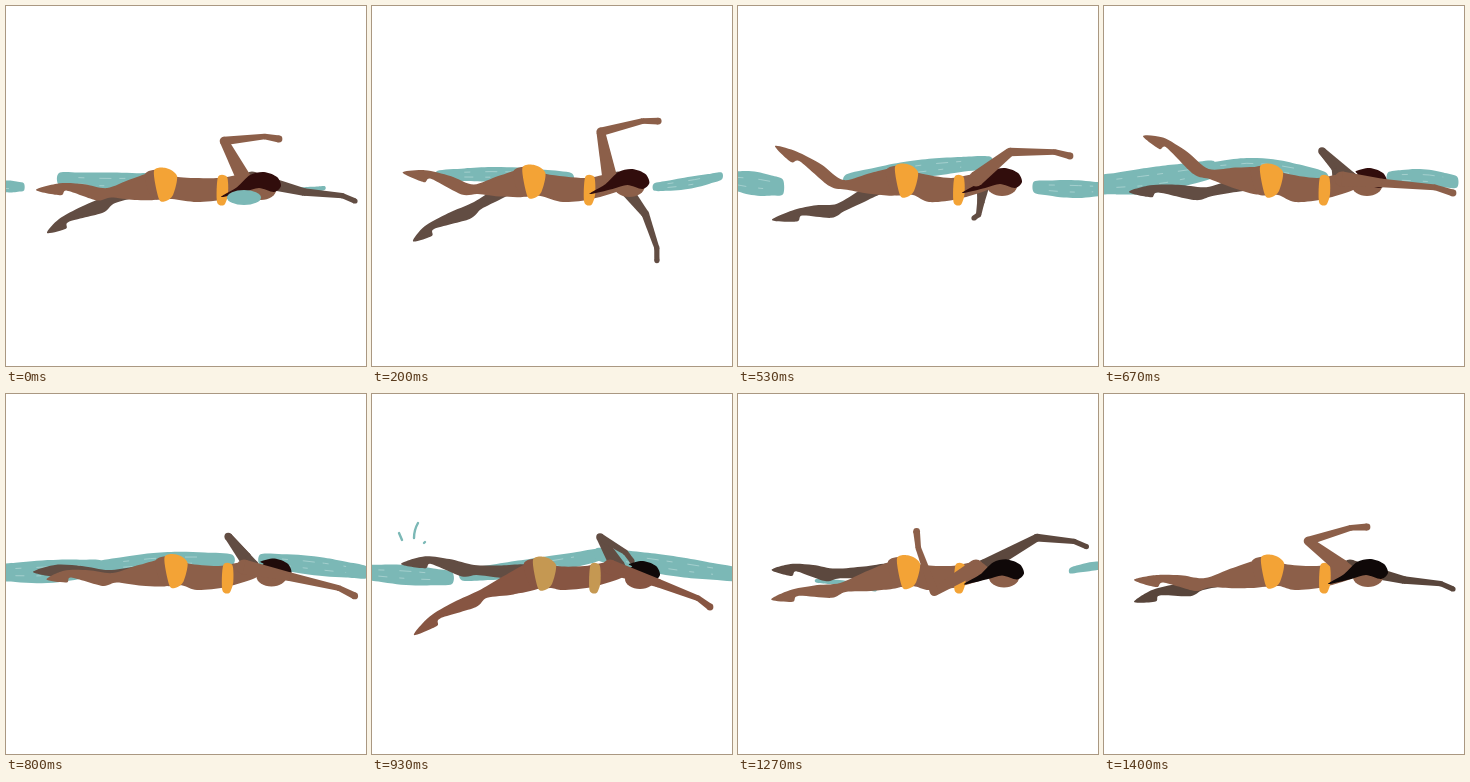
An HTML page that plays this animation: 360x360 px, repeating every 1.54 s.

```html
<!DOCTYPE html>
<html lang="en">
<head>
<meta charset="utf-8">
<title>Swimmer</title>
<style>
html, body { margin: 0; width: 100%; height: 100%; overflow: hidden; background: #fff; }
svg { display: block; width: 100vw; height: 100vh; }
</style>
</head>
<body>
<svg id="stage" viewBox="0 0 360 360"></svg>
<script>
const LOOP = 1540, STEPS = 22;
const WATER = '#7bb8b6', FOAM = '#b5d9d7';
const SHOULDER = { near: [238, 173], far: [246, 173] };
const GIRTH = { near: [7.5, 4.3, 2.8, 3.4], far: [7.5, 3.8, 2.6, 2.6] };
const stage = document.getElementById('stage');

// Key poses. Legs: knee, ankle, toe. Arms: elbow, hand.
// Waves: both ends, bow of the middle, half height.
const poses = [];
const pose = (at, joints) => poses.push({ at, joints });

pose(0, {
  hip: [152, 180],
  nearLeg: [102, 188, 57, 181, 30, 184], farLeg: [104, 195, 57, 215, 41, 227],
  nearArm: [218, 135, 273, 133], farArm: [298, 186, 349, 195],
  left: [-12, 180, 18, 181, 0, 6], mid: [53, 173, 150, 174, 3, 10], right: [285, 184, 319, 182, 1, 3]
});
pose(5, {
  hip: [156, 175],
  nearLeg: [103, 182, 54, 160, 31, 155], farLeg: [106, 205, 56, 227, 41, 241],
  nearArm: [238, 127, 293, 111], farArm: [252, 200, 237, 226],
  left: [-50, 176, -20, 178, 0, 9], mid: [74, 167, 232, 170, -5, 6], right: [280, 179, 370, 162, 2, 8]
});
pose(8, {
  hip: [161, 176],
  nearLeg: [106, 180, 59, 150, 37, 140], farLeg: [102, 203, 60, 207, 34, 214],
  nearArm: [272, 146, 332, 150], farArm: [243, 195, 236, 212],
  left: [-12, 174, 45, 181, 0, 12], mid: [108, 174, 252, 156, -2, 9], right: [296, 181, 370, 183, 1, 9]
});
pose(10, {
  hip: [160, 176],
  nearLeg: [104, 169, 60, 136, 39, 130], farLeg: [104, 187, 49, 183, 25, 186],
  nearArm: [278, 177, 349, 187], farArm: [218, 145, 231, 171],
  left: [-12, 179, 110, 163, 3, 13], mid: [90, 166, 222, 172, -8, 9], right: [284, 172, 353, 176, -2, 9]
});
pose(14, {
  hip: [165, 181],
  nearLeg: [111, 201, 62, 224, 42, 241], farLeg: [102, 177, 55, 166, 29, 170],
  nearArm: [286, 189, 338, 213], farArm: [228, 143, 260, 167],
  left: [-12, 178, 80, 184, 0, 10], mid: [90, 181, 230, 160, 3, 9], right: [225, 160, 370, 181, 1, 10]
});
pose(16, {
  hip: [166, 180],
  nearLeg: [106, 202, 55, 221, 38, 235], farLeg: [102, 162, 61, 136, 39, 128],
  nearArm: [261, 198, 246, 231], farArm: [244, 134, 294, 143],
  left: [-12, 178, 38, 171, 0, 13], mid: [117, 176, 233, 203, -4, 7], right: [282, 181, 370, 167, -4, 11]
});
pose(21, {
  hip: [161, 179],
  nearLeg: [102, 190, 55, 185, 30, 186], farLeg: [95, 193, 51, 199, 30, 208],
  nearArm: [204, 147, 263, 133], farArm: [300, 186, 349, 195],
  left: [-50, 178, -30, 178, 0, 0], mid: [52, 194, 74, 191, 0, 0], right: [365, 174, 380, 174, 0, 0]
});

const mix = (a, b, u) => a + (b - a) * u;
const mixAll = (a, b, u) => a.map((v, i) => mix(v, b[i], u));
const clamp = v => Math.min(1, Math.max(0, v));
const n = v => v.toFixed(1);
const rgb = (a, b, u) => `rgb(${mixAll(a, b, u).map(Math.round)})`;
const pairs = list => Array.from({ length: list.length / 2 }, (_, i) => [list[2 * i], list[2 * i + 1]]);
const shift = (list, [x, y]) => pairs(list).map(p => [p[0] + x, p[1] + y]);

// Arms turn around shoulder and elbow and reach further in a wide swing.
function mixArm(root, a, b, u) {
  const from = [...root, ...a], to = [...root, ...b], out = [...root];
  const bone = (p, i) => {
    const dx = p[i + 2] - p[i], dy = p[i + 3] - p[i + 1];
    return [Math.hypot(dx, dy), Math.atan2(dy, dx)];
  };
  for (const i of [0, 2]) {
    const [la, ta] = bone(from, i), [lb, tb] = bone(to, i);
    let turn = tb - ta;
    while (turn < -1.75) turn += 2 * Math.PI;
    while (turn > 4.53) turn -= 2 * Math.PI;
    const stretch = 1 + 0.25 * Math.sin(Math.PI * u) * clamp(Math.abs(turn) / 1.57);
    const len = mix(la, lb, u) * stretch, ang = ta + turn * u;
    out.push(out[i] + len * Math.cos(ang), out[i + 1] + len * Math.sin(ang));
  }
  return out;
}

function jointsAt(step) {
  let k = 0;
  while (k < poses.length - 2 && step >= poses[k + 1].at) k++;
  const a = poses[k], b = poses[k + 1], u = (step - a.at) / (b.at - a.at);
  const out = {};
  for (const name in a.joints) {
    const root = name.endsWith('Arm') && SHOULDER[name.slice(0, -3)];
    const from = a.joints[name], to = b.joints[name];
    out[name] = root ? mixArm(root, from, to, u) : mixAll(from, to, u);
  }
  return out;
}

const path = (d, fill) => `<path d="${d}" fill="${fill}"/>`;
const line = pts => 'M' + pts.map(p => p.map(n).join(' ')).join('L');
const oval = (x, y, rx, ry, fill) =>
  `<ellipse cx="${n(x)}" cy="${n(y)}" rx="${n(rx)}" ry="${n(ry)}" fill="${fill}"/>`;

function blob(pts, fill) {
  const at = i => pts[(i + pts.length) % pts.length];
  let d = line([pts[0]]);
  pts.forEach((q, i) => {
    const p = at(i - 1), r = at(i + 1), s = at(i + 2);
    d += 'C' + [q[0] + (r[0] - p[0]) / 7, q[1] + (r[1] - p[1]) / 7,
      r[0] - (s[0] - q[0]) / 7, r[1] - (s[1] - q[1]) / 7, r[0], r[1]].map(n).join(' ');
  });
  return path(d + 'Z', fill);
}

// Outline along thigh, shin and foot: bone, place on it, offset upwards.
function leg(hip, list, thigh, fill) {
  const j = [hip, ...pairs(list)];
  const spot = (i, u, up) => {
    const [x, y] = j[i], dx = j[i + 1][0] - x, dy = j[i + 1][1] - y;
    const len = Math.hypot(dx, dy);
    return [x + dx * u - dy / len * up, y + dy * u + dx / len * up];
  };
  const above = [spot(0, 0, -12 * thigh), spot(0, .5, -10 * thigh), spot(0, .95, -4),
    spot(1, .22, -8), spot(1, .9, -3), spot(2, .12, -8)];
  const below = [spot(2, .1, 4), spot(1, .55, 6), spot(0, 1, 6),
    spot(0, .5, 11 * thigh), spot(0, 0, 13 * thigh)];
  return blob([...above, j[3], ...below], fill);
}

function arm(list, radii, fill) {
  const [root, elbow, hand] = pairs(list);
  const dx = hand[0] - elbow[0], dy = hand[1] - elbow[1], len = Math.hypot(dx, dy) || 1;
  const wrist = [elbow[0] + dx * .74 + dy / len * 3, elbow[1] + dy * .74 - dx / len * 3];
  const p = [root, elbow, wrist, hand];
  return p.map(([x, y], i) => {
    const r = radii[i], dot = oval(x, y, r, r, fill);
    if (!i) return dot;
    const [px, py] = p[i - 1], d = Math.hypot(x - px, y - py) || 1;
    const nx = (py - y) / d, ny = (x - px) / d, s = radii[i - 1];
    return dot + path(line([[px + nx * s, py + ny * s], [x + nx * r, y + ny * r],
      [x - nx * r, y - ny * r], [px - nx * s, py - ny * s]]) + 'Z', fill);
  }).join('');
}

function wave([x0, y0, x1, y1, bow, half]) {
  if (half < .5) return '';
  const edge = k => Array.from({ length: 6 }, (_, i) => {
    const u = i / 5, hump = Math.sin(Math.PI * u);
    return [mix(x0, x1, u), mix(y0, y1, u) + bow * hump + k * half * (.6 + .4 * hump)];
  });
  const streak = (k, dash) => `<path d="${line(edge(k).slice(1, -1))}" fill="none" stroke="${FOAM}" ` +
    `stroke-dasharray="${dash}" opacity=".7"/>`;
  return blob([...edge(-1), ...edge(1).reverse()], WATER) +
    (half > 5 ? streak(-.4, '6 15 12 8') + streak(.35, '9 12 5 17') : '');
}

function hair([x, y], tail, fill) {
  const tip = [mix(-13, -40, tail), mix(-9, 7, tail)];
  const strand = (k, dy) => [tip[0] * k, tip[1] * k + dy];
  const pts = [tip, strand(.6, -7), [-11, -15], [3, -18], [16, -13], [20, -4], [13, 2], [-2, -2], strand(.42, -1)];
  return blob(pts.map(p => [p[0] + x, p[1] + y]), fill);
}

function drops(step) {
  const d = 'M27 139l3 7M46 129q-4 7-4 15M52 149l1-1';
  return `<path d="${d}" fill="none" stroke="${WATER}" stroke-width="2.4" stroke-linecap="round" ` +
    `transform="translate(0 ${(14 - step) * 4})"/>`;
}

function draw(step) {
  const p = jointsAt(step), hip = p.hip;
  const dull = clamp(1 - Math.abs(step - 14) / 2);
  const skin = rgb([140, 95, 73], [135, 85, 66], dull);
  const shade = rgb([98, 77, 67], [88, 69, 59], clamp((step - 16) / 5));
  const suit = rgb([243, 163, 54], [197, 152, 82], dull);
  const dark = rgb([49, 13, 12], [15, 8, 8], clamp((step - 10) / 4));
  const head = [hip[0] + 103, hip[1] + 4];
  const tail = clamp((Math.abs(step - 12.2) - 2) / 2);
  const torso = [
    ...shift([-6, 12, -13, -12, 4, -16.5, 20, -9], hip),
    [213, 172], [242, 168], [252, 182], [220, 193], [191, 196],
    ...shift([14, 13], hip)
  ];
  const brief = shift([-4, -15, 8, -18, 19, -10, 15, 9, 8, 15, 1, 13], hip);
  const top = shift([-4, 0, 5, 0, 6, 17, 2, 28, -5, 25], [140 + hip[0] / 2, 171]);
  const nearArm = arm(p.nearArm, GIRTH.near, skin);
  const locks = hair(head, tail, dark);
  const splash = clamp(1 - step / 3);

  stage.innerHTML = wave(p.left) + wave(p.mid) + wave(p.right) +
    (Math.abs(step - 14) < 2 ? drops(step) : '') +
    leg([hip[0] - 8, hip[1] - 2], p.farLeg, .6, shade) +
    arm(p.farArm, GIRTH.far, shade) +
    leg(hip, p.nearLeg, 1, skin) +
    blob(torso, skin) + blob(brief, suit) + blob(top, suit) +
    oval(...head, 15, 10, skin) +
    (step < 7 || step > 18 ? nearArm + locks : locks + nearArm) +
    (splash ? oval(238, 191.5, 17 * splash, 7.5 * splash, WATER) : '');
}

// Pictures change on a 15 per second beat, rounded to 10 ms; the last one holds.
const startOf = step => Math.round(step * 20 / 3) * 10;
let shown = -1, began;
function tick(now) {
  began ??= now;
  const t = (now - began) % LOOP;
  let step = STEPS - 1;
  while (startOf(step) > t) step--;
  if (step !== shown) draw(shown = step);
  requestAnimationFrame(tick);
}
draw(0);
requestAnimationFrame(tick);
</script>
</body>
</html>
```
